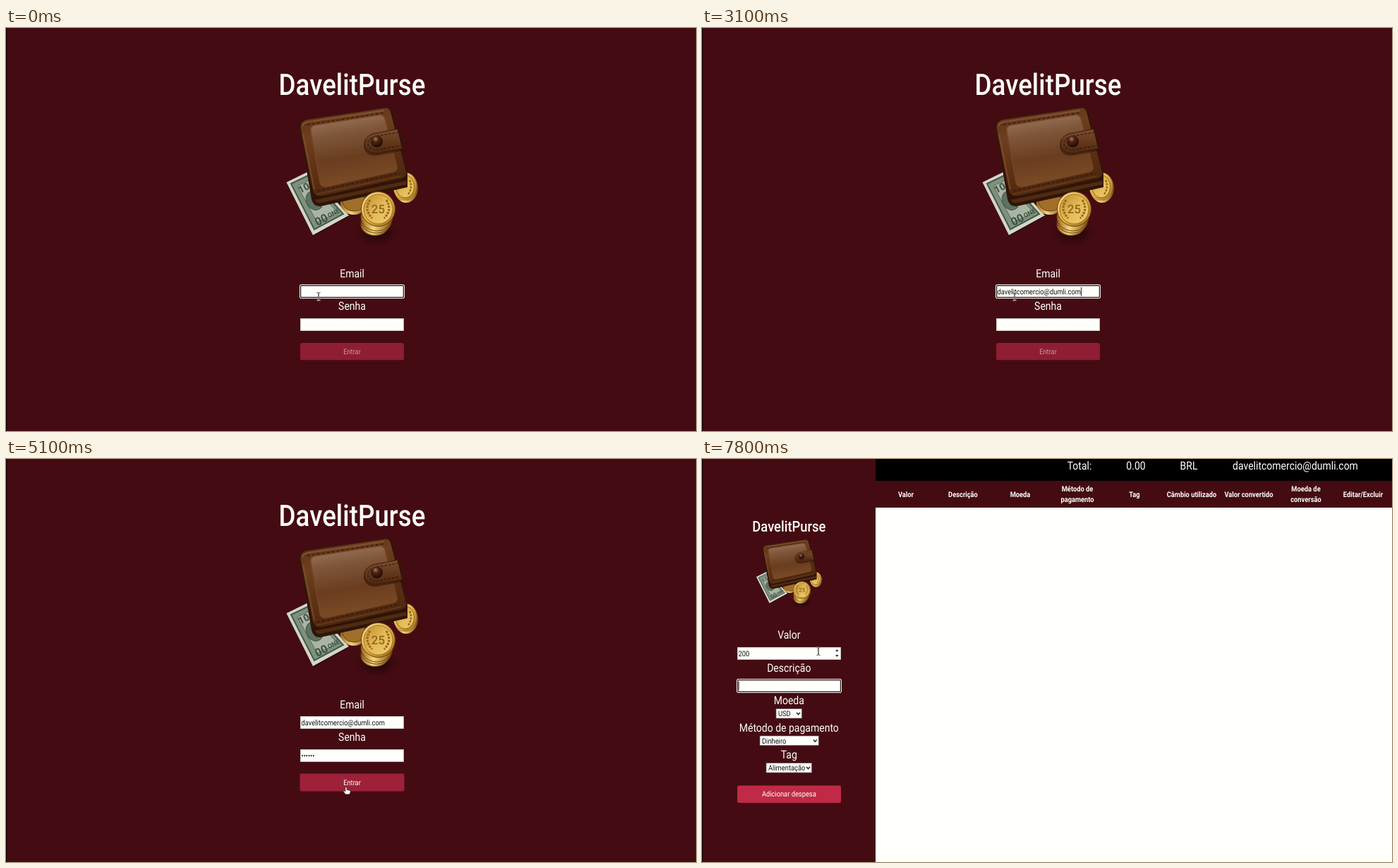
Write an HTML page that moves like this. It is 978 by 572 pixels and loops after 8000 ms.

```html
<!DOCTYPE html>
<html lang="pt-BR">
<head>
<meta charset="utf-8">
<title>DavelitPurse</title>
<style>
  html, body { margin: 0; width: 100%; height: 100%; overflow: hidden; background: #440c12; }
  svg { display: block; width: 978px; height: 572px; }
  text { font-family: Roboto, "Liberation Sans", sans-serif; fill: #fffffc; white-space: pre; text-rendering: geometricPrecision; }
</style>
</head>
<body>
<svg id="stage" viewBox="0 0 978 572" xmlns="http://www.w3.org/2000/svg">
  <defs>
    <linearGradient id="leather" x1="0" y1="0" x2=".35" y2="1">
      <stop offset="0" stop-color="#5c3115"/><stop offset=".35" stop-color="#6d3e1f"/>
      <stop offset=".7" stop-color="#5c3013"/><stop offset="1" stop-color="#4f280f"/>
    </linearGradient>
    <linearGradient id="panel" x1="0" y1="0" x2=".2" y2="1">
      <stop offset="0" stop-color="#a07d64"/><stop offset=".3" stop-color="#80573b"/>
      <stop offset=".65" stop-color="#6a3d1f"/><stop offset="1" stop-color="#7b4b26"/>
    </linearGradient>
    <linearGradient id="strap" x1="0" y1="0" x2="0" y2="1">
      <stop offset="0" stop-color="#7d4d2d"/><stop offset="1" stop-color="#4e2710"/>
    </linearGradient>
    <radialGradient id="snap" cx=".4" cy=".3" r=".7">
      <stop offset="0" stop-color="#a87a60"/><stop offset=".35" stop-color="#4f2411"/><stop offset="1" stop-color="#1d0b05"/>
    </radialGradient>
    <linearGradient id="gold" x1="0" y1="0" x2="1" y2="1">
      <stop offset="0" stop-color="#fbe79a"/><stop offset=".5" stop-color="#dcae45"/><stop offset="1" stop-color="#9a6516"/>
    </linearGradient>
    <linearGradient id="face" x1="0" y1="0" x2="1" y2="1">
      <stop offset="0" stop-color="#c08c30"/><stop offset=".5" stop-color="#e3ba55"/><stop offset="1" stop-color="#f0cf74"/>
    </linearGradient>
    <linearGradient id="rim" x1="0" y1="0" x2="1" y2="0">
      <stop offset="0" stop-color="#9a651a"/><stop offset=".4" stop-color="#f3d77e"/><stop offset="1" stop-color="#7a4a0e"/>
    </linearGradient>
    <radialGradient id="shade">
      <stop offset="0" stop-color="#140204" stop-opacity=".75"/><stop offset="1" stop-color="#140204" stop-opacity="0"/>
    </radialGradient>

    <g id="wallet">
      <ellipse cx="526" cy="290" rx="32" ry="20" fill="url(#shade)"/>
      <path d="M399 222L430 205L486 268L436 296Z" fill="#1c0508" opacity=".5"/>
      <path d="M397.500 219L430 203L486 266L435 294Z" fill="#d3d6c8"/>
      <path d="M404 221L429 209L478 264L437 286Z" fill="#7f907c" stroke="#43594a" stroke-width="2"/>
      <path d="M413 224L430 216L470 262L441 276Z" fill="#a9b5a2" stroke="#586c5a"/>
      <ellipse cx="437" cy="245" rx="11" ry="14" transform="rotate(-28 437 245)" fill="#5d7261" stroke="#3c5144"/>
      <g transform="rotate(-27 452 269)" font-weight="700">
        <text x="437" y="275" font-size="16" style="fill:#3c5144">00</text>
        <text x="457" y="272" font-size="9" style="fill:#3c5144">ONE</text>
      </g>
      <text transform="translate(417 235) rotate(-27)" font-size="14" font-weight="700" style="fill:#3c5144">10</text>

      <ellipse cx="493" cy="248" rx="19" ry="17" fill="url(#rim)"/>
      <ellipse cx="493" cy="246" rx="16" ry="14" fill="#a26f2a" stroke="#67400f"/>
      <ellipse cx="567" cy="227" rx="17" ry="21" fill="url(#rim)"/>
      <ellipse cx="565.500" cy="225" rx="16.500" ry="20" fill="url(#gold)"/>
      <ellipse cx="565.500" cy="225" rx="13" ry="16" fill="url(#face)" stroke="#94661c"/>
      <path d="M572 216Q577 226 570 236" fill="none" stroke="#94661c" stroke-width="2.500" stroke-dasharray="3 1.500"/>

      <path d="M416 143Q414 132 425 130L538 112.500Q545 112 547 118L569 207V226L446 253Q436 254 433 243Z" fill="#2f1508"/>
      <path d="M438 244L567 217L568 222L446 248Q440 249 438 244Z" fill="#512a11"/>
      <path d="M417.500 142Q417 132 427 130L538 113.500Q543 113 545 119L567 204Q568 211 561 213L449 238Q438 240 435 231Z" fill="url(#leather)"/>
      <path d="M432 145Q432 139 438 138L528 124Q535 123 537 129L554 197Q555 202 549 204L456 225Q447 227 445 220Z" fill="url(#panel)" stroke="#7a4b2b" stroke-opacity=".5" stroke-width="2"/>
      <path d="M420 139Q422 134 429 133L536 117" fill="none" stroke="#9a7050" stroke-width="1.500" opacity=".6"/>
      <path d="M421 150L437 229" fill="none" stroke="#8a5a36" stroke-width="2" opacity=".55"/>
      <path d="M440 236L560 210" fill="none" stroke="#8a5a36" stroke-width="1.200" opacity=".5"/>
      <path d="M427 137.500L538 120M441 231.500L558 206" fill="none" stroke="#341707" stroke-width="1.300" stroke-dasharray="4 3"/>
      <path d="M559 146L521 153Q506 158 507 169Q510 182 525 181L564 174Z" fill="#2f1408" opacity=".6"/>
      <path d="M557 143L520 150Q507 155 508 166Q511 178 525 178L562 171Z" fill="url(#strap)" stroke="#3b1c0b"/>
      <path d="M556 148L522 154Q512 158 513 165Q515 173 526 173L559 167" fill="none" stroke="#2f1509" stroke-width="1.200" stroke-dasharray="3 2.500"/>
      <path d="M556 143L563 172" stroke="#33170a" stroke-width="3"/>
      <circle cx="525.500" cy="161" r="8.500" fill="url(#snap)"/>

      <g stroke="#6b400c">
        <ellipse cx="523" cy="279" rx="20" ry="15.500" fill="url(#rim)"/>
        <ellipse cx="525" cy="274" rx="21.500" ry="17" fill="url(#rim)"/>
        <ellipse cx="525.500" cy="268" rx="22.500" ry="20" fill="url(#rim)"/>
        <ellipse cx="527.500" cy="257" rx="24" ry="24.500" fill="url(#gold)"/>
      </g>
      <ellipse cx="527.500" cy="257" rx="20.500" ry="21" fill="url(#face)" stroke="#a87522"/>
      <path d="M516 244Q507 258 519 270M539 244Q548 258 536 270" fill="none" stroke="#94661c" stroke-width="3" stroke-dasharray="3 1.500"/>
      <text x="527.500" y="263" font-size="17" font-weight="500" text-anchor="middle" style="fill:#94661c">25</text>
    </g>
  </defs>
  <rect width="978" height="572" fill="#440c12"/>
  <g id="login"></g>
  <g id="app"></g>
  <rect width="1.200" height="572" fill="#0c0203"/>
  <g id="beam" fill="none">
    <path d="M-2.500 -5.500Q0 -5.500 0 -4V4Q0 5.500 -2.500 5.500M2.500 -5.500Q0 -5.500 0 -4V4Q0 5.500 2.500 5.500" stroke="#d8d4d0" stroke-width="2"/>
    <path d="M-2.500 -5.500Q0 -5.500 0 -4V4Q0 5.500 -2.500 5.500M2.500 -5.500Q0 -5.500 0 -4V4Q0 5.500 2.500 5.500" stroke="#55504e" stroke-width=".9"/>
  </g>
  <path id="arrow" d="M0 0V10.500L2.400 8.300L4.200 12L5.900 11.200L4.200 7.600H7.400Z" fill="#111" stroke="#eee" stroke-width=".8"/>
  <path id="hand" d="M-1.200 1Q0 -.6 1.200 1V4.500L5 5.200Q6.500 5.600 6.300 7.200L5.300 11H-.8L-4 7Q-4.200 5.500 -2.800 5.700L-1.200 7Z" fill="#fff" stroke="#2a1114" stroke-width=".8"/>
</svg>
<script>
const LOOP = 8000, NARROW = 0.875, SMALL = 10.67;
const WHITE = '#fffffc', RED = '#c02a46';
const BRAND = 'DavelitPurse', MAIL = 'davelitcomercio@dumli.com';
const $ = id => document.getElementById(id);
const login = $('login'), app = $('app');

function add(parent, tag, attrs) {
  const el = document.createElementNS('http://www.w3.org/2000/svg', tag);
  for (const key in attrs) el.setAttribute(key, attrs[key]);
  parent.appendChild(el);
  return el;
}
const box = (parent, x, y, width, height, fill, more) =>
  add(parent, 'rect', { x, y, width, height, fill, ...more });

// All lettering shares one condensed width.
function label(parent, x, y, str, size = 16, color = WHITE, weight = 400, anchor = 'middle') {
  const el = add(parent, 'text', {
    transform: `translate(${x} ${y}) scale(${NARROW} 1)`,
    'font-size': size, 'font-weight': weight, 'text-anchor': anchor
  });
  el.style.fill = color;
  el.textContent = str;
  return el;
}

function field(parent, x, y) {
  box(parent, x, y, 147, 18, '#a9a0a0');
  box(parent, x + 0.6, y + 0.6, 145.8, 16.8, WHITE);
  const ring = add(parent, 'g', {});
  box(ring, x - 0.5, y - 0.5, 148, 19, 'none', { stroke: WHITE, rx: 1.5 });
  box(ring, x + 0.6, y + 0.6, 145.8, 16.8, 'none', { stroke: '#1b1012', 'stroke-width': 1.2, rx: 1 });
  const text = label(parent, x + 1.5, y + 12.7, '', SMALL, '#111', 400, 'start');
  const caret = box(parent, 0, y + 3, 0.9, 12.5, '#111');
  return (str, focus, blink = true) => {
    text.textContent = str;
    show(ring, focus);
    show(caret, focus && blink);
    caret.setAttribute('x', x + 1.6 + (str ? text.getComputedTextLength() * NARROW : 0));
  };
}

function select(x, y, width, str) {
  box(app, x, y, width, 13.5, WHITE, { stroke: '#6b5a5a', 'stroke-width': 0.7 });
  label(app, x + 3, y + 10.6, str, SMALL, '#111', 400, 'start');
  add(app, 'path', {
    d: `M${x + width - 7.5} ${y + 5.4}l2.500 2.800l2.500 -2.800`,
    fill: 'none', stroke: '#111', 'stroke-width': 1.4
  });
}

function show(el, on) { el.style.display = on ? '' : 'none'; }

// Login screen
label(login, 490.5, 94.5, BRAND, 42, WHITE, 500);
add(login, 'use', { href: '#wallet' });
label(login, 490.5, 353.7, 'Email');
const mail = field(login, 417, 365);
label(login, 490.5, 400.3, 'Senha');
const pass = field(login, 417, 412);
const glow = box(login, 416, 446, 149, 26, '#6f1727', { rx: 3 });
const enter = box(login, 417, 447, 147, 24.3, RED, { rx: 2.5 });
const enterText = label(login, 490.5, 462.8, 'Entrar', SMALL);

// Expenses screen
box(app, 246, 0, 732, 572, WHITE);
box(app, 246, 0, 732, 31, '#000');
box(app, 246, 31, 732, 38, '#440c12');
[[535, 'Total:'], [615, '0.00'], [690, 'BRL'], [841, MAIL]].forEach(([x, s]) => label(app, x, 15, s));
['Valor', 'Descrição', 'Moeda', 'Método de|pagamento', 'Tag', 'Câmbio utilizado',
 'Valor convertido', 'Moeda de|conversão', 'Editar/Excluir'].forEach((head, i) => {
  const lines = head.split('|');
  lines.forEach((s, n) => label(app, 289 + 81 * i, (lines.length > 1 ? 46 : 53.6) + 15.4 * n, s, SMALL, WHITE, 700));
});
label(app, 123.3, 102.8, BRAND, 21, WHITE, 500);
add(app, 'use', { href: '#wallet', transform: 'translate(-121.900 57.800) scale(.5)' });
[[255, 'Valor'], [301.7, 'Descrição'], [348, 'Moeda'], [386.5, 'Método de pagamento'], [425, 'Tag']]
  .forEach(([y, s]) => label(app, 123.3, y, s));
const value = field(app, 50, 267);
const spinner = add(app, 'path', { d: 'M189 273l2.300 -3l2.300 3zM189 278l2.300 3l2.300 -3z', fill: '#333' });
const note = field(app, 50, 313);
select(105, 354.5, 36.5, 'USD');
select(82, 393, 83.3, 'Dinheiro');
select(91, 431.6, 64.5, 'Alimentação');
box(app, 50, 463.5, 147, 24.5, RED, { rx: 2.5 });
label(app, 123.3, 479.3, 'Adicionar despesa', SMALL);

// [time, letters typed]
const mailKeys = [[0, 0], [100, 1], [200, 2], [300, 3], [500, 4], [600, 5], [700, 6], [800, 7], [900, 8],
  [1000, 10], [1200, 11], [1400, 12], [1500, 14], [1800, 15], [2100, 17], [2200, 18], [2300, 19],
  [2400, 20], [2600, 21], [2900, 22], [3000, 24], [3100, 25]];
const passKeys = [[0, 0], [3600, 2], [3700, 3], [3900, 5], [4000, 6]];
const valueKeys = [[0, 0], [7000, 1], [7600, 2], [7800, 3]];
// [time, x, y, pointer]
const path = [[0, 443, 381, 'beam'], [4600, 446, 391, 'arrow'], [4700, 454, 410, 'arrow'], [4800, 463, 430, 'arrow'],
  [4900, 473, 450, 'hand'], [5000, 480, 461, 'hand'], [5100, 482, 465, 'hand'], [5200, 481.8, 465.5, 'arrow'],
  [5300, 470, 456, 'arrow'], [5500, 350, 396, 'arrow'], [5700, 212, 328, 'arrow'], [5900, 172, 286, 'arrow'],
  [6100, 167, 255, 'arrow'], [6300, 165, 273, 'beam']];

const at = (steps, t) => steps.filter(s => s[0] <= t).pop();

function draw(t) {
  const inApp = t >= 5200;
  show(login, !inApp);
  show(app, inApp);
  if (inApp) {
    value('200'.slice(0, at(valueKeys, t)[1]), t >= 6500 && t < 7800, t < 7400 || t >= 7600);
    note('', t >= 7800);
    show(spinner, t >= 6300);
  } else {
    const ready = t >= 4000, hover = t >= 4900;
    mail(MAIL.slice(0, at(mailKeys, t)[1]), t < 3300, t >= 100);
    pass('•'.repeat(at(passKeys, t)[1]), t >= 3300 && t < 5100);
    show(glow, t >= 5100);
    enter.setAttribute('fill', !ready ? '#8f1d33' : hover ? '#9c2139' : RED);
    enterText.style.fill = ready ? WHITE : '#c59aa1';
  }
  const [, x, y, kind] = at(path, t);
  for (const id of ['beam', 'arrow', 'hand']) {
    show($(id), id === kind);
    $(id).setAttribute('transform', `translate(${x} ${y})`);
  }
}

const start = performance.now();
function tick() {
  draw((performance.now() - start) % LOOP);
  requestAnimationFrame(tick);
}
tick();
</script>
</body>
</html>
```
